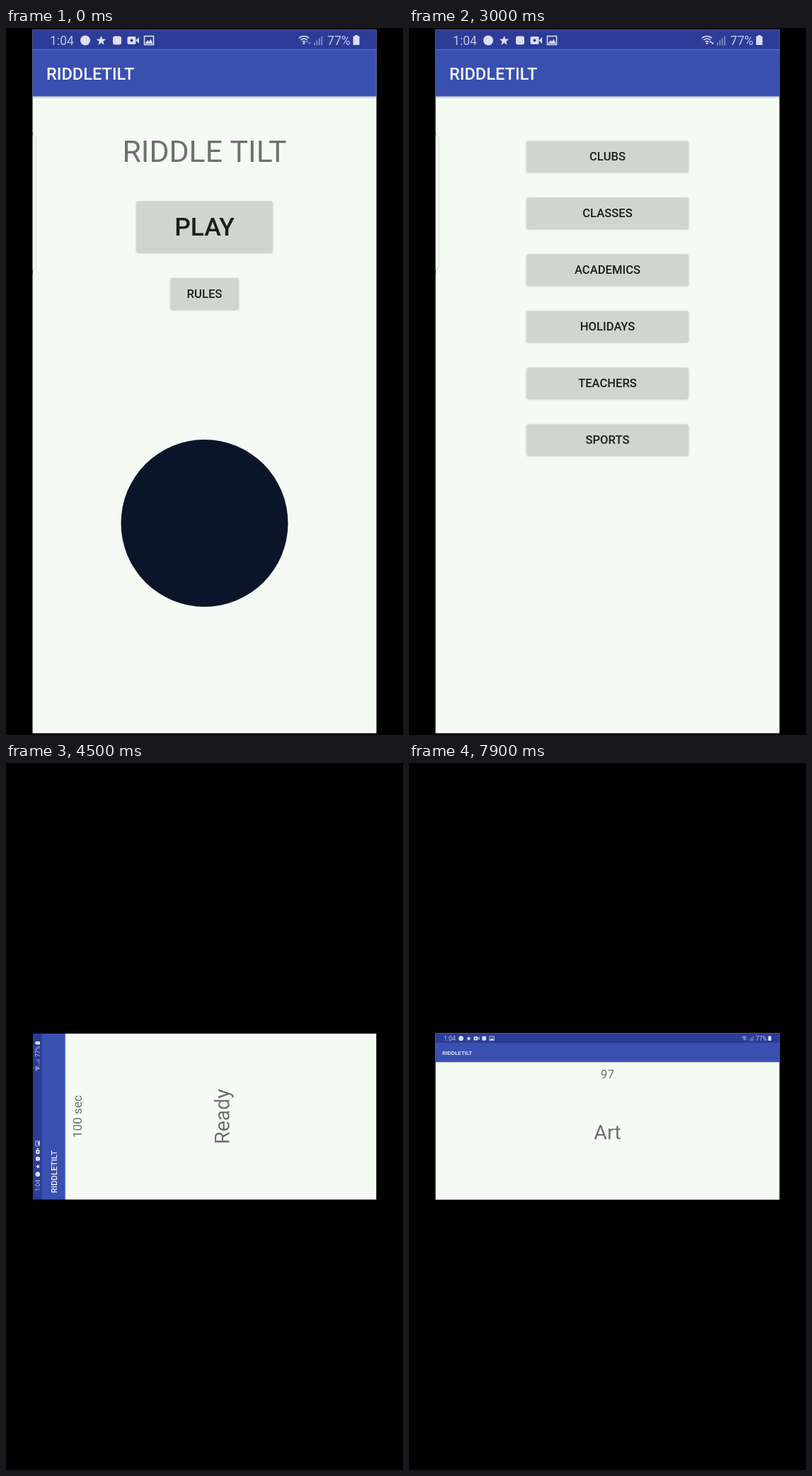
An HTML page with a canvas for the animation above (8 s loop, 561 px wide and 998 px high).

```html
<!DOCTYPE html>
<html lang="en">
<head>
<meta charset="utf-8">
<title>Trivia app</title>
<style>
html, body { margin: 0; width: 100%; height: 100%; overflow: hidden; background: #000; }
canvas { display: block; }
</style>
</head>
<body>
<canvas id="stage" width="561" height="998"></canvas>
<script>
const stage = document.getElementById('stage').getContext('2d');
const LOOP = 8000, STEP = 100;
const LEFT = 37.5, TOP = 2.5, W = 486, H = 993;         // portrait screen
const WIDE_TOP = 381.5, WIDE_H = 235, ZOOM = W / 1005;  // landscape screen, shown smaller
const WIDE_W = W / ZOOM;
const PAPER = '#f5faf5', GREY = '#6d726d', ICON = '#d9def3';
const TOPICS = ['CLUBS', 'CLASSES', 'ACADEMICS', 'HOLIDAYS', 'TEACHERS', 'SPORTS'];
const clamp = v => Math.max(0, Math.min(1, v));

function box(c, x, y, w, h, color, r = 0) {
  c.fillStyle = color;
  c.beginPath();
  c.roundRect(x, y, w, h, r);
  c.fill();
}

function poly(c, points, color) {
  c.fillStyle = color;
  c.beginPath();
  points.forEach(p => c.lineTo(...p));
  c.fill();
}

function disc(c, x, y, r, color) {
  c.fillStyle = color;
  c.beginPath();
  c.arc(x, y, r, 0, 7);
  c.fill();
}

function label(c, text, x, y, size, color, weight = 400, align = 'center') {
  c.font = `${weight} ${size}px Roboto, sans-serif`;
  c.textAlign = align;
  c.fillStyle = color;
  c.fillText(text, x, y);
}

function button(c, text, y, w, h, size, press = 0) {
  const x = (W - w) / 2;
  c.save();
  c.shadowColor = 'rgba(0,0,0,.25)';
  c.shadowBlur = 3;
  c.shadowOffsetY = 1;
  box(c, x, y, w, h, '#d1d5d0', 2);
  c.restore();
  if (press) box(c, x, y, w, h, `rgba(0,0,0,${0.16 * press})`, 2);
  label(c, text, W / 2, y + h / 2 + size * 0.36, size, '#1b1e1c', 500);
}

const icons = {
  chat: (c, x) => disc(c, x, 15, 7, ICON),
  star(c, x) {
    const tips = Array.from({ length: 10 }, (_, i) => {
      const a = i * Math.PI / 5, r = i % 2 ? 3 : 7;
      return [x + r * Math.sin(a), 15.5 - r * Math.cos(a)];
    });
    poly(c, tips, ICON);
  },
  app: (c, x) => box(c, x - 6, 9, 12, 12, ICON, 3),
  video(c, x) {
    box(c, x - 8, 9.5, 12, 11, ICON, 2);
    poly(c, [[x + 4, 15], [x + 8.5, 10.5], [x + 8.5, 19.5]], ICON);
    disc(c, x - 2, 15, 2, '#2c3c97');
  },
  photo(c, x) {
    c.strokeStyle = ICON;
    c.lineWidth = 1.6;
    c.strokeRect(x - 6.5, 9, 13, 12);
    poly(c, [[x - 5.5, 19.5], [x - 2, 14.5], [x, 17], [x + 2.5, 13], [x + 5.5, 19.5]], ICON);
  }
};

// Clock and icons stay in place while screens slide beneath them.
function status(c, w, t) {
  const order = t < 5800
    ? ['chat', 'star', 'app', 'video', 'photo']
    : ['chat', 'star', 'video', 'app', 'photo'];
  label(c, '1:04', 24.5, 21, 17.6, '#bcc4e8', 400, 'left');
  order.forEach((name, i) => icons[name](c, 74.5 + i * 22.5));

  const x = w - 102.5;
  c.strokeStyle = ICON;
  c.lineWidth = 1.5;
  for (const r of [3, 6.5, 10]) {
    c.beginPath();
    c.arc(x, 19, r, -2.36, -0.78);
    c.stroke();
  }
  disc(c, x, 19, 1.5, ICON);
  const arrows = t >= 1000 && t < 4200 ? ICON : '#7f8bc8';
  poly(c, [[x + 3, 18], [x + 5, 15], [x + 7, 18]], arrows);
  poly(c, [[x + 6, 18], [x + 10, 18], [x + 8, 21]], arrows);
  for (let i = 0; i < 4; i++) box(c, x + 14 + i * 3.4, 18 - i * 3, 2, 4 + i * 3, '#7884c2');
  label(c, '77%', w - 69.5, 21, 17.6, '#c3caea', 400, 'left');
  box(c, w - 30.5, 7.5, 4, 2, ICON);
  box(c, w - 33, 9, 9, 12.5, ICON, 1);
}

function frame(c, wide) {
  const w = wide ? WIDE_W : W, h = wide ? WIDE_H / ZOOM : H, bar = wide ? 84 : 94;
  box(c, 0, 0, w, h, PAPER);
  const shade = c.createLinearGradient(0, bar, 0, bar + 4);
  shade.addColorStop(0, 'rgba(0,0,0,.2)');
  shade.addColorStop(1, 'rgba(0,0,0,0)');
  box(c, 0, bar, w, 4, shade);
  box(c, 0, 0, w, 28, '#2c3c97');
  box(c, 0, 28, w, bar - 28, '#3a50b1');
  label(c, 'RIDDLETILT', 19.5, wide ? 63.5 : 70.5, wide ? 16.6 : 23.6, '#f4f6fb', 500, 'left');
}

function home(c, t) {
  frame(c);
  label(c, 'RIDDLE TILT', W / 2, 186.5, 42.8, GREY);
  button(c, 'PLAY', 242, 192, 72, 35.4, clamp(t / 400));
  button(c, 'RULES', 350.5, 96, 44, 16.7);
  disc(c, W / 2, 696.5, 118, '#0b1529');
}

function menu(c, t) {
  frame(c);
  TOPICS.forEach((name, i) =>
    button(c, name, 157 + i * 80, 228.5, 43.5, 16.6, i === 1 ? clamp((t - 3500) / 300) : 0));
}

function ready(c) {
  frame(c);
  label(c, '100 sec', W / 2, 141.5, 35.5, GREY);
  label(c, 'Ready', W / 2, 567.5, 59, GREY);
}

function readyShot(c, t) {
  ready(c);
  status(c, W, t);
}

function game(c, t) {
  c.scale(ZOOM, ZOOM);
  frame(c, true);
  status(c, WIDE_W, t);
  const count = t < 6000 ? '100 sec' : t < 7000 ? '98' : '97';
  label(c, count, WIDE_W / 2, 131.5, 35.5, GREY);
  label(c, t < 7900 ? 'Ready' : 'Art', WIDE_W / 2, 309.5, 59, GREY);
}

function layer(paint, t, h = H) {
  const canvas = document.createElement('canvas');
  canvas.width = W;
  canvas.height = h;
  paint(canvas.getContext('2d'), t);
  return canvas;
}

// The next screen slides up over the present one while fading in.
function slideIn(c, paint, t, start, lift, alpha) {
  if (t < start) return;
  const since = t - start;
  c.save();
  c.beginPath();
  c.rect(0, 0, W, H);
  c.clip();
  if (since < 300) box(c, 0, 94, W, H - 94, 'rgba(0,0,0,.015)');
  c.globalAlpha = clamp(alpha + since / 160);
  c.drawImage(layer(paint, t), 0, Math.round(lift * (1 - clamp(since / 400)) ** 5));
  c.restore();
}

function portrait(c, t) {
  c.translate(LEFT, TOP);
  if (t < 1000) {
    home(c, t);
    slideIn(c, menu, t, 500, 222, 0.47);
  } else if (t < 4200) {
    menu(c, t);
    slideIn(c, ready, t, 3800, 233, 0.09);
  } else {
    ready(c);
  }
  status(c, W, t);
  // edge panel handle
  c.beginPath();
  c.roundRect(-1, 148.5, 5.5, 191, [0, 5, 5, 0]);
  c.fillStyle = '#fafcfa';
  c.fill();
  c.strokeStyle = '#cdd1cd';
  c.lineWidth = 1;
  c.stroke();
  box(c, -3, 145, 3, 200, '#000');
}

// Old screen turns and stretches into the wide shape, cross-fading to the new one.
function turn(c, t, p) {
  const w = WIDE_H + (W - WIDE_H) * p, h = W + (WIDE_H - W) * p;
  c.beginPath();
  c.rect(LEFT, WIDE_TOP, W, WIDE_H);
  c.clip();
  c.translate(LEFT + W / 2, WIDE_TOP + WIDE_H / 2);
  c.rotate((p - 1) * Math.PI / 2);
  c.beginPath();
  c.rect(-w / 2, -h / 2, w, h);
  c.clip();
  c.globalAlpha = 1 - p;
  c.drawImage(layer(readyShot, t), -w / 2, -h / 2, w, h);
  c.globalCompositeOperation = 'lighter';
  c.globalAlpha = p;
  c.drawImage(layer(game, t, WIDE_H), -W / 2, -WIDE_H / 2);
}

function draw(now) {
  const t = Math.floor(now % LOOP / STEP) * STEP;
  const c = stage;
  c.save();
  box(c, 0, 0, 561, 998, '#000');
  if (t < 4500) {
    portrait(c, t);
  } else if (t < 5800) {
    turn(c, t, 1 - (1 - clamp((t - 5300) / 500)) ** 3);
  } else {
    c.translate(LEFT, WIDE_TOP);
    game(c, t);
  }
  c.restore();
}

function tick() {
  draw(performance.now());
  requestAnimationFrame(tick);
}
tick();
</script>
</body>
</html>
```
